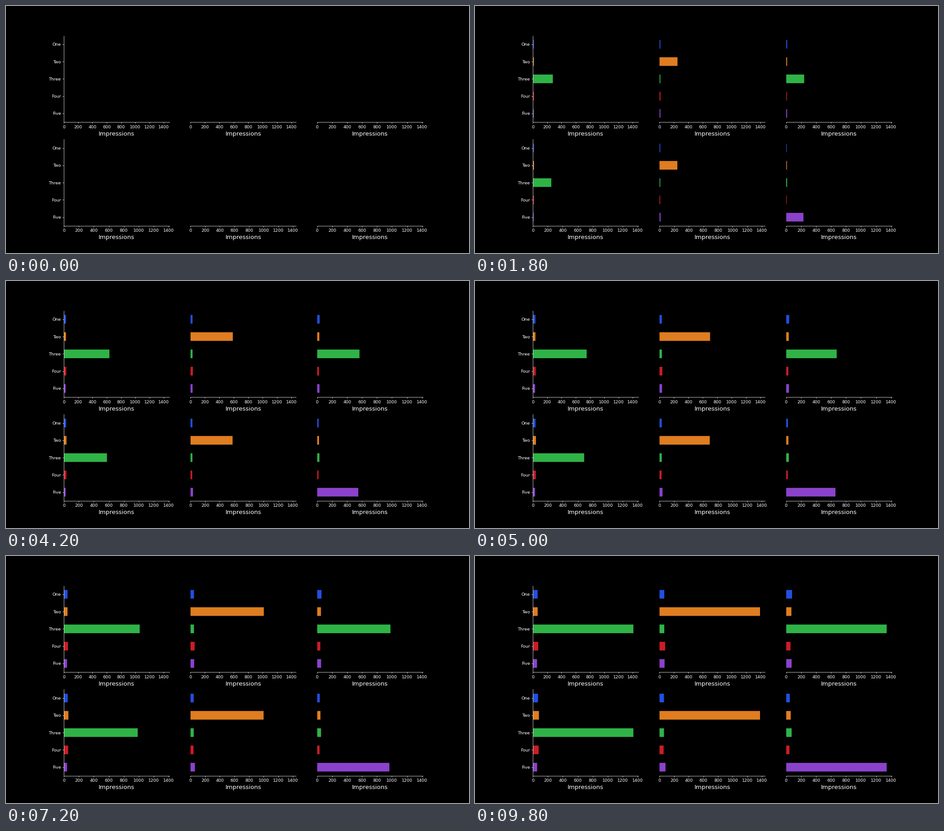
Recreate the animation shown at these times as a matplotlib script. Size 1025 px wide and 547 px high, loop 10 s.

```python
import colorsys

import numpy as np
import matplotlib.pyplot as plt
from matplotlib.animation import FuncAnimation
from matplotlib.colors import to_rgb

SIZE = (15, 8.005)
DPI = 1025 / 15
STEPS = 50
NAMES = ["One", "Two", "Three", "Four", "Five"]
BRIGHT = ["#023EFF", "#FF7C00", "#1AC938", "#E8000B", "#8B2BE2"]

# Per panel: final impressions of each option, and how far growth bows
# above (positive) or below (negative) a straight line
PANELS = [
    ([67, 67, 1408, 75, 58], 0.10),
    ([66, 1392, 66, 78, 70], -0.03),
    ([79, 70, 1344, 58, 73], -0.03),
    ([69, 81, 1342, 77, 57], 0.00),
    ([61, 1374, 61, 56, 82], -0.04),
    ([49, 61, 73, 44, 1344], -0.08),
]


def soften(color, amount=0.75):
    h, l, s = colorsys.rgb_to_hls(*to_rgb(color))
    return colorsys.hls_to_rgb(h, l, s * amount)


def counts_at(step, final, bow):
    """Whole impressions of each option after the given step."""
    t = step / (STEPS - 1)
    return np.round(np.array(final) * (t + bow * t * (1 - t)))


def style_panel(ax, first_column, x_max):
    ax.set_facecolor("black")
    ax.set_xlim(0, x_max)
    ax.set_ylim(4.5, -0.5)
    ax.set_xticks(np.arange(0, x_max, 200))
    ax.set_xlabel("Impressions", color="white", fontsize=14)
    ax.tick_params(colors="white", labelsize=10)
    for spine in ax.spines.values():
        spine.set_color("white")
    ax.spines[["top", "right"]].set_visible(False)
    if first_column:
        ax.set_yticks(range(5), NAMES)
    else:
        ax.set_yticks([])
        ax.spines["left"].set_visible(False)


plt.rcParams["font.family"] = "DejaVu Sans"
fig, axes = plt.subplots(2, 3, figsize=SIZE, dpi=DPI, facecolor="black")
colors = [soften(c) for c in BRIGHT]
charts = []
for p, (ax, (final, _)) in enumerate(zip(axes.flat, PANELS)):
    charts.append(ax.barh(range(5), [0] * 5, height=0.5, color=colors,
                          snap=False))
    style_panel(ax, p % 3 == 0, max(final) * 1.05)


def update(step):
    for bars, (final, bow) in zip(charts, PANELS):
        for bar, count in zip(bars, counts_at(step, final, bow)):
            bar.set_width(count)
    return [bar for bars in charts for bar in bars]


anim = FuncAnimation(fig, update, frames=STEPS, interval=200, repeat=True,
                     repeat_delay=0, blit=False)
plt.show()
```
